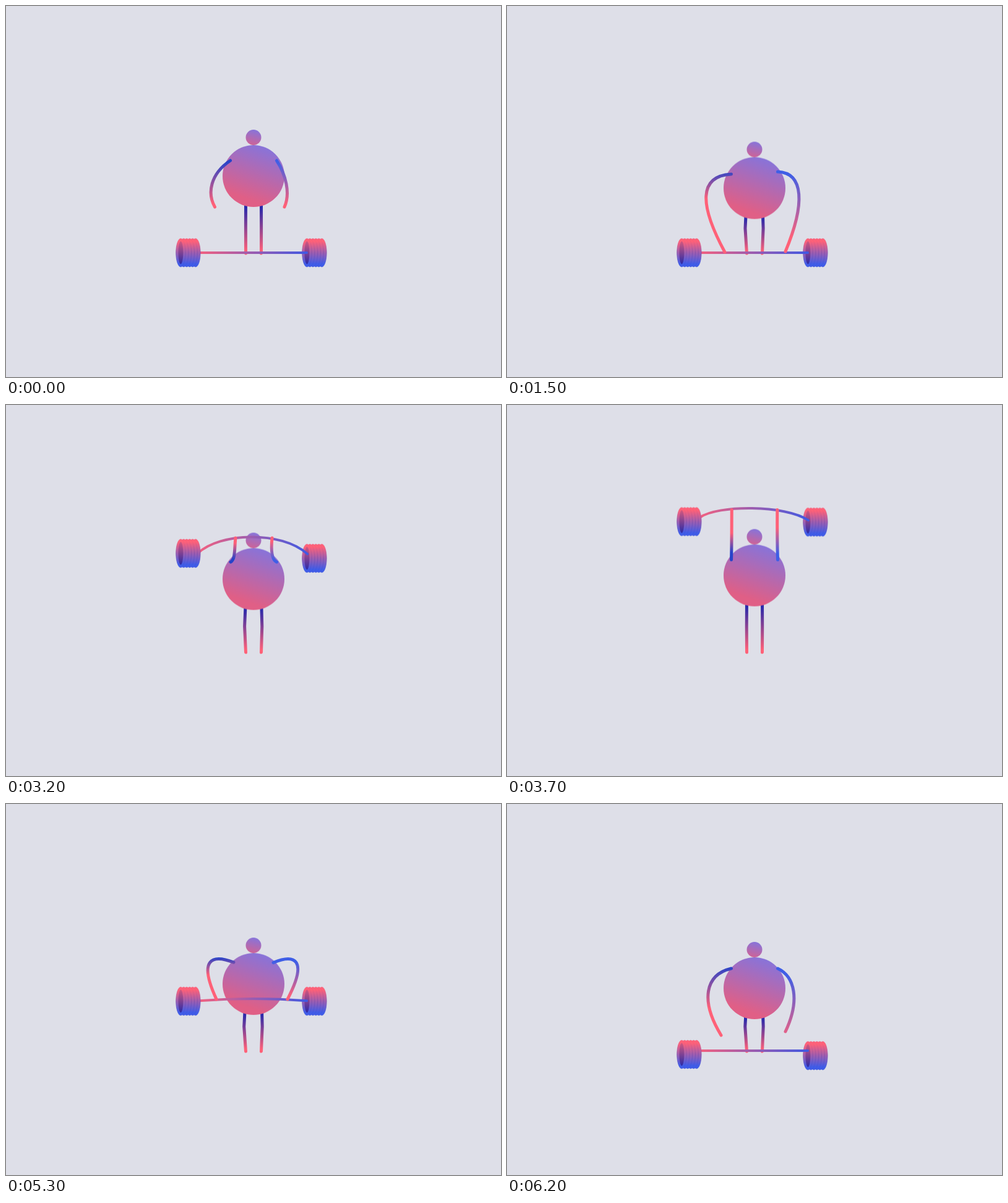
These frames come from a looping animation (800 px wide and 600 px high, 6.3 s). An HTML page without scripts:

```html
<!DOCTYPE html>
<html lang="en">
<head>
<meta charset="utf-8">
<title>Weightlifter</title>
<style>
  html, body { margin: 0; width: 100%; height: 100%; overflow: hidden; background: #dedfe8; }
  svg { display: block; width: 100%; height: 100%; }

  svg {
    --launch: cubic-bezier(.45, 0, .75, .66);
    --settle: cubic-bezier(.25, .62, .5, 1);
  }
  .move { animation: 6.3s var(--settle) infinite; }
  .line { fill: none; stroke-width: 5; stroke-linecap: round; stroke-linejoin: round; }
  .body { animation-name: squat; fill: url(#skin); }
  .weight { --sag: 0px; animation-name: lift; }
  .weight.right { --sag: 2px; }
  .bar { animation-name: bend; stroke: url(#barFill); stroke-width: 4; }
  .left.leg { animation-name: leftLeg; }
  .right.leg { animation-name: rightLeg; }
  .leg { stroke: url(#legFill); }
  .left.arm { animation-name: leftArm; stroke: url(#leftArmFill); }
  .right.arm { animation-name: rightArm; stroke: url(#rightArmFill); }

  /* Beats: 0 stand, 13 dip, 24 grab, 38 pull, 51 catch, 64 press, 84 lower, 94 drop, 98 release */
  @keyframes squat {
    0% { transform: none; animation-timing-function: var(--launch); }
    12.7% { transform: translateY(2.7px); }
    38.1% { transform: translateY(24.6px); }
    50.8% { transform: translateY(6.5px); }
    63.5%, 69.8% { transform: none; animation-timing-function: var(--launch); }
    84.1% { transform: translateY(16px); }
    93.7% { transform: translateY(24.5px); }
    98.4%, 100% { transform: translateY(23px); }
  }
  @keyframes lift {
    0%, 38.1% { transform: none; animation-timing-function: var(--launch); }
    50.8% { transform: translateY(calc(-159px + 4 * var(--sag))); }
    63.5%, 69.8% { transform: translateY(-215.5px); animation-timing-function: var(--launch); }
    84.1% { transform: translateY(-81px); }
    93.7% { transform: none; }
    98.4%, 100% { transform: translateY(calc(6px + var(--sag))); }
  }
  @keyframes bend {
    0%, 34.9% { d: path("M310 399C370 399 430 399 486 399"); }
    38.1% { d: path("M310 396.5C370 394 430 394 486 396.5"); animation-timing-function: var(--launch); }
    50.8% { d: path("M310 240C345 206 445 203 487 241"); }
    63.5%, 69.8% { d: path("M312 176C340 157 450 157 487 181"); animation-timing-function: var(--launch); }
    84.1% { d: path("M312 317.5C370 313 430 313 486 317.5"); }
    95%, 100% { d: path("M310 399C370 399 430 399 486 399"); }
  }
  @keyframes leftLeg {
    0%, 63.5%, 69.8% { d: path("M387.5 320L387.4 358L387.5 400"); animation-timing-function: var(--launch); }
    12.7%, 50.8% { d: path("M387 325L385.6 358L387.5 400"); }
    38.1%, 93.7%, 100% { d: path("M385.7 344L384.8 360L387.5 400"); }
    84.1% { d: path("M386 336L384.7 360L387.5 400"); }
  }
  @keyframes rightLeg {
    0%, 63.5%, 69.8% { d: path("M412.5 320L412.6 358L412.5 400"); animation-timing-function: var(--launch); }
    12.7%, 50.8% { d: path("M412.9 325L413.8 358L412.5 400"); }
    38.1%, 93.7%, 100% { d: path("M413.7 344L414.2 360L412.5 400"); }
    84.1% { d: path("M413.6 336L414.2 360L412.5 400"); }
  }
  @keyframes leftArm {
    0% { d: path("M362.5 250C330 272 325 303 337.5 325"); animation-timing-function: var(--launch); }
    12.7% { d: path("M362.5 261C330 277 319 308 339.5 344"); }
    23.8%, 34.9% { d: path("M362.5 272C309 275 311 322 352 398"); }
    38.1% { d: path("M362.5 272.5C309 275 312 321 351 394.5"); animation-timing-function: var(--launch); }
    50.8% { d: path("M363 254C371 250 369 232 371 215"); }
    63.5%, 69.8% { d: path("M362.5 250C362.5 222 362.5 193 362.5 165"); animation-timing-function: var(--launch); }
    84.1% { d: path("M368 256C333 242 310 250 340 315"); }
    93.7% { d: path("M363 270C313 274 311 318 350 392"); }
    98.4%, 100% { d: path("M362.5 266C320 276 312 318 346 374"); }
  }
  @keyframes rightArm {
    0% { d: path("M437.5 250C452 272 460 303 450 325"); animation-timing-function: var(--launch); }
    12.7% { d: path("M437.5 261C458 282 464 315 450 345"); }
    23.8%, 34.9% { d: path("M437.5 268C480 270 482 320 450 397"); }
    38.1% { d: path("M437.5 265.5C480 267 482 316 449.5 386.5"); animation-timing-function: var(--launch); }
    50.8% { d: path("M437.5 254C429 250 428 235 430 215"); }
    63.5%, 69.8% { d: path("M437.5 250C437.5 222 437.5 193 437.5 165"); animation-timing-function: var(--launch); }
    84.1% { d: path("M432 256.5C466 242 489 250 455 315"); }
    93.7% { d: path("M437 268C475 274 482 318 450 390"); }
    98.4%, 100% { d: path("M437.5 266C465 279 474 317 450 368"); }
  }
</style>
</head>
<body>
<svg viewBox="0 0 800 600">
  <defs>
    <linearGradient id="skin" x1=".68" y1="0" x2=".37" y2=".86">
      <stop stop-color="#8574dc"/><stop offset="1" stop-color="#e05f86"/>
    </linearGradient>
    <linearGradient id="headFill" href="#skin" y2="1.25"/>
    <linearGradient id="legFill" x1="0" y1=".05" x2="0" y2=".95">
      <stop stop-color="#2428ac"/><stop offset="1" stop-color="#ff6178"/>
    </linearGradient>
    <linearGradient id="barFill" gradientUnits="userSpaceOnUse" x1="305" y1="0" x2="487" y2="0">
      <stop stop-color="#f9617c"/><stop offset="1" stop-color="#4159e2"/>
    </linearGradient>
    <linearGradient id="plateFill" x1="0" y1=".1" x2="0" y2=".9">
      <stop stop-color="#ff6178"/><stop offset="1" stop-color="#3f5ce8"/>
    </linearGradient>
    <linearGradient id="plateEdge" x1="0" y1=".1" x2="0" y2=".9">
      <stop stop-color="#f25e7c"/><stop offset=".5" stop-color="#7c4aa6"/><stop offset="1" stop-color="#3d56de"/>
    </linearGradient>
    <linearGradient id="holeFill" x1="0" y1="0" x2="0" y2="1">
      <stop stop-color="#d2587f"/><stop offset="1" stop-color="#2a2ba8"/>
    </linearGradient>

    <!-- The colour runs from shoulder to hand, so it turns over when the arms go up -->
    <linearGradient id="leftArmFill" gradientUnits="userSpaceOnUse" x1="0" x2="0">
      <stop stop-color="#2743c9"/><stop offset="1" stop-color="#ff6178"/>
      <animate attributeName="y1" dur="6.3s" repeatCount="indefinite" values="252;262;270;249;222;248;264" keyTimes="0;.13;.38;.51;.7;.84;1"/>
      <animate attributeName="y2" dur="6.3s" repeatCount="indefinite" values="320;322;298;222;185;276;336" keyTimes="0;.13;.38;.51;.7;.84;1"/>
    </linearGradient>
    <linearGradient id="rightArmFill" gradientUnits="userSpaceOnUse" x1="0" x2="0">
      <stop stop-color="#3f5ee6"/><stop offset="1" stop-color="#ff6178"/>
      <animate attributeName="y1" dur="6.3s" repeatCount="indefinite" values="252;262;285;250;225;255;279" keyTimes="0;.13;.38;.51;.7;.84;1"/>
      <animate attributeName="y2" dur="6.3s" repeatCount="indefinite" values="322;365;388;218;170;310;395" keyTimes="0;.13;.38;.51;.7;.84;1"/>
    </linearGradient>

    <ellipse id="plate" cx="282.4" cy="399" rx="7.7" ry="22.9" fill="url(#plateFill)" stroke="url(#plateEdge)" stroke-width=".7"/>
    <g id="weight">
      <use href="#plate" x="24"/>
      <use href="#plate" x="19.2"/>
      <use href="#plate" x="14.4"/>
      <use href="#plate" x="9.6"/>
      <use href="#plate" x="4.8"/>
      <use href="#plate"/>
      <ellipse cx="282.4" cy="399" rx="4" ry="18.5" fill="url(#holeFill)"/>
    </g>
  </defs>

  <path class="move line left leg" d="M387.5 320L387.4 358L387.5 400"/>
  <path class="move line right leg" d="M412.5 320L412.6 358L412.5 400"/>
  <g class="move body">
    <circle cx="400" cy="275" r="50"/>
    <circle cx="400" cy="212.5" r="12.5" fill="url(#headFill)"/>
  </g>
  <g class="move weight right"><use href="#weight" x="204"/></g>
  <path class="move line bar" d="M310 399C370 399 430 399 486 399"/>
  <g class="move weight"><use href="#weight"/></g>
  <path class="move line left arm" d="M362.5 250C330 272 325 303 337.5 325"/>
  <path class="move line right arm" d="M437.5 250C452 272 460 303 450 325"/>
</svg>
</body>
</html>
```
